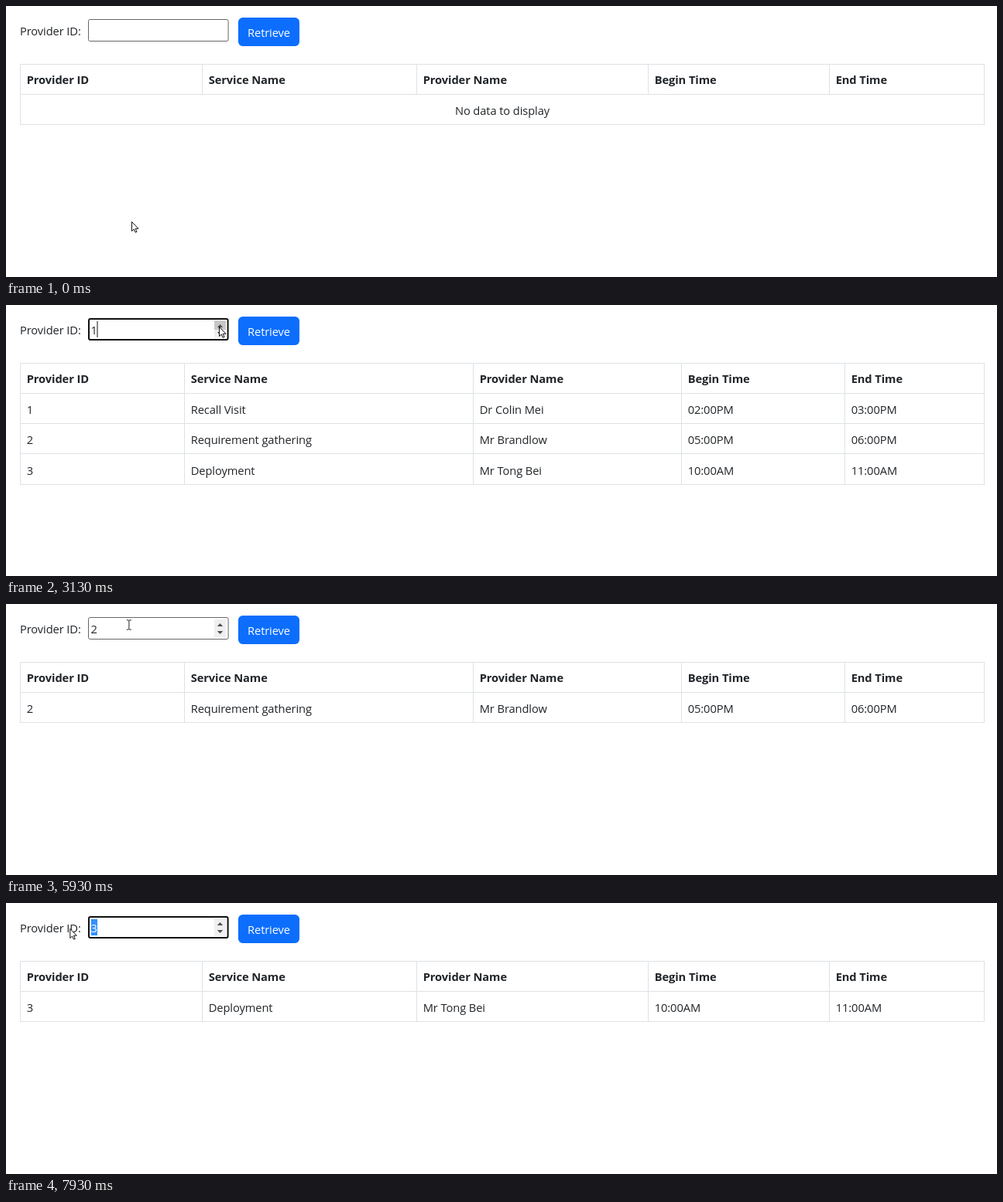
Write an HTML page that moves like this. It is 1280x351 px and loops after 8 s.

```html
<!DOCTYPE html>
<html lang="en">
<head>
<meta charset="utf-8">
<title>Provider lookup</title>
<style>
  html, body { margin: 0; width: 100%; height: 100%; overflow: hidden; background: #fff; }
  svg { display: block; width: 100%; height: 100%; }
  text { font: 14.7px "Open Sans", "Noto Sans", sans-serif; letter-spacing: -0.1px; fill: #212529; }
  .head { font-weight: 700; }
  .mid { text-anchor: middle; }
  .grid { stroke: #dee2e6; fill: none; }
  .ptr { stroke: #111; fill: #fff; stroke-linejoin: round; }
  #box { fill: #fff; stroke: #666; }
  #box.focus { stroke: #101010; stroke-width: 2; }
  #btn { fill: #0d6efd; }
  #btn.hover { fill: #0b60de; }
  #value.picked, .label { fill: #fff; }
</style>
</head>
<body>
<svg viewBox="0 0 1280 351">
  <text x="18" y="37.5">Provider ID:</text>
  <rect id="box" rx="2"/>
  <g id="spin">
    <rect x="269" y="20" width="15" height="23" fill="#efefef"/>
    <rect id="press" x="269" y="20" width="15" height="12" fill="#c8c8c8"/>
    <path d="M272.8 29 L276.5 25 L280.2 29Z M272.8 35 L276.5 39 L280.2 35Z" fill="#505050"/>
  </g>
  <rect id="mark" x="110" y="21" width="8" height="21" fill="#3390ff"/>
  <text id="value" x="109.6" y="37.5"></text>
  <rect id="caret" y="21" width="1" height="21" fill="#111"/>
  <rect id="btn" x="300" y="15" width="79" height="37" rx="5.7"/>
  <text class="mid label" x="339.5" y="39.8">Retrieve</text>
  <g id="table"></g>
  <g id="pointer">
    <path id="arrow" class="ptr" d="M.5 .5 V12.6 L3.3 10 L5.1 14.2 L7 13.4 L5.2 9.3 H9Z"/>
    <path id="beam" d="M-3 -6.2 H-1 L0 -5.4 L1 -6.2 H3 M0 -5.4 V5.4 M-3 6.2 H-1 L0 5.4 L1 6.2 H3" fill="none" stroke="#222"/>
    <path id="hand" class="ptr" transform="translate(-1 -1)" d="M-1.5 10 V1 Q-1.5 -.5 0 -.5 T1.5 1 V5.5 Q3 4.6 3.8 6 Q5 5.3 5.8 6.6 Q7 6.2 7.2 8 V11 Q7 13.5 5.6 15.8 H-1 Q-2 13.6 -3.6 11.8 L-5.4 9.2 Q-5.6 7.4 -3.8 7.8 Z"/>
  </g>
</svg>
<script>
const LOOP = 8000, FPS = 15, BLINK = 530;
const $ = id => document.getElementById(id);

const heads = ["Provider ID", "Service Name", "Provider Name", "Begin Time", "End Time"];
const rows = [
  ["1", "Recall Visit", "Dr Colin Mei", "02:00PM", "03:00PM"],
  ["2", "Requirement gathering", "Mr Brandlow", "05:00PM", "06:00PM"],
  ["3", "Deployment", "Mr Tong Bei", "10:00AM", "11:00AM"]
];
const narrow = [18.5, 253.5, 530.5, 829.5, 1063.5, 1263.5];
const wide = [18.5, 230.5, 603.5, 872.5, 1083.5, 1263.5];

const button = [318, 32], field = [127, 26], label = [82, 33], spinner = [275, 28];

// Each lookup: the field takes focus, a number goes in, the button is clicked.
const lookups = [{ focus: 2200, type: 3130, click: 3670 }];
const clicks = [1330, 3670];

// [start, duration, goal]
const moves = [
  [0, 330, [150, 302]],
  [670, 500, button],
  [1730, 340, [206, 34]],
  [2800, 270, spinner],
  [3270, 260, button]
];

// Later lookups: drag over the old number, type a new one, go back to the button.
function retype(leave, type = Infinity, click = Infinity) {
  moves.push([leave, 270, field], [leave + 340, 200, label], [type - 35, 500, button]);
  lookups.push({ focus: leave + 340, type, click });
  clicks.push(click);
}
retype(3935, 4870, 5670);
retype(5730, 6435, 7330);
retype(7400);

const clamp = v => Math.max(0, Math.min(1, v));
const ease = u => u * u * (3 - 2 * u);
const show = (id, on) => $(id).setAttribute("visibility", on ? "visible" : "hidden");
const set = (id, attrs) => Object.entries(attrs).forEach(([k, v]) => $(id).setAttribute(k, v));
const lineY = i => Math.floor(75 + 39.3 * i) + 0.5;
const textY = i => 101.3 + 39.4 * i;

function pointerAt(t) {
  return moves.reduce((from, [start, time, to]) => {
    const e = ease(clamp((t - start) / time));
    return from.map((v, i) => v + (to[i] - v) * e);
  }, [162, 279]);
}

const overButton = ([x, y]) => x >= 300 && x < 379 && y > 15 && y < 52;

function dataAfter(count) {
  if (count < 2) return count ? rows : [];
  return [rows[count - 2]];
}

function drawTable(data) {
  const cols = data.includes(rows[1]) ? wide : narrow;
  const count = Math.max(data.length, 1);
  const cells = (list, i, cls) =>
    list.map((s, c) => `<text class="${cls}" x="${cols[c] + 8.2}" y="${textY(i)}">${s}</text>`).join("");
  let d = "";
  for (let i = 0; i < count + 2; i++) d += `M18 ${lineY(i)}H1264`;
  cols.forEach((x, c) => {
    const last = data.length || c % 5 === 0 ? count + 1 : 1;
    d += `M${x} ${lineY(0)}V${lineY(last)}`;
  });
  $("table").innerHTML = `<path class="grid" d="${d}"/>` + cells(heads, 0, "head") +
    (data.map((r, i) => cells(r, i + 1, "cell")).join("") ||
      `<text class="mid" x="641" y="${textY(1)}">No data to display</text>`);
}

let shown = -1;

function draw(t) {
  const count = clicks.filter(c => c + 60 <= t).length;
  if (count !== shown) drawTable(dataAfter(shown = count));

  const p = pointerAt(t), [x, y] = p;
  const now = lookups.filter(l => l.focus <= t).pop();
  const focused = !!now && t < now.click;
  const picked = focused && t < now.type && x < 114;
  const typed = lookups.filter(l => l.type <= t).length;
  const lastEdit = now && (now.type <= t ? now.type : now.focus);
  const caretOn = focused && !picked && (t - lastEdit) % (2 * BLINK) < BLINK;

  const inset = focused ? 1 : 0.5;
  set("box", { x: 106 + inset, y: 17 + inset, width: 181.6 - 2 * inset, height: 29 - 2 * inset });
  $("box").classList.toggle("focus", focused);

  const inRow = y > 16 && y < 47;
  const onSpinner = inRow && x > 268 && x < 286;
  show("spin", focused || (inRow && x > 106 && x < 288));
  show("press", focused && onSpinner && Math.hypot(x - spinner[0], y - spinner[1]) < 1);
  show("mark", picked);
  $("value").textContent = typed || "";
  $("value").classList.toggle("picked", picked);
  show("caret", caretOn);
  set("caret", { x: typed ? 117.5 : 110 });

  // The hover shade lingers briefly after the pointer leaves.
  $("btn").classList.toggle("hover", overButton(p) || overButton(pointerAt(t - 100)));

  const onButton = overButton(p);
  const onText = inRow && x > 104 && x < 300 && !onSpinner;
  set("pointer", { transform: `translate(${x.toFixed(1)} ${y.toFixed(1)})` });
  show("hand", onButton);
  show("beam", onText);
  show("arrow", !onButton && !onText);
}

// The picture advances in steps of 1/15 s, rounded to 10 ms.
const start = performance.now();
function tick() {
  const t = (performance.now() - start) % LOOP;
  const step = Math.floor((t + 4) * FPS / 1000) % (LOOP * FPS / 1000);
  draw(Math.round(step * 100 / FPS) * 10);
  requestAnimationFrame(tick);
}
draw(0);
requestAnimationFrame(tick);
</script>
</body>
</html>
```
